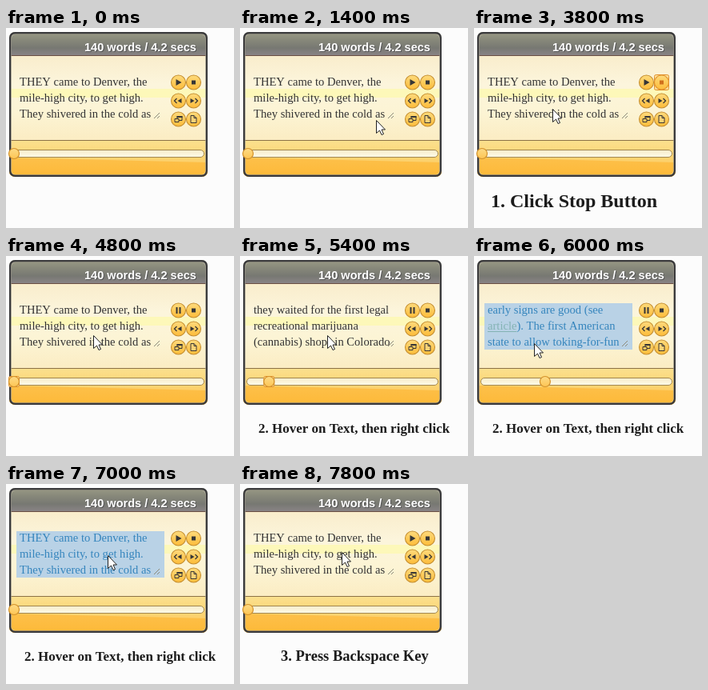
These frames come from a looping animation (285x250 px, 8000 ms). An HTML page with a canvas:

```html
<!DOCTYPE html>
<html lang="en">
<head>
<meta charset="utf-8">
<title>Speed reader</title>
<style>
html, body { margin: 0; width: 285px; height: 250px; overflow: hidden; background: #fcfcfc; }
canvas { display: block; }
</style>
</head>
<body>
<canvas id="stage" width="285" height="250"></canvas>
<script>
const ctx = document.getElementById('stage').getContext('2d');
const LOOP = 8000, STEP = 200, PAGE_TIME = 460, FADE = 400;
const SERIF = '"Liberation Serif", "Times New Roman", serif';
const SANS = '"Liberation Sans", Arial, sans-serif';
const INK = '#363636', ORANGE = '#e0902c', PALE = '#fddf98';

const pages = [
  ['THEY came to Denver, the', 'mile-high city, to get high.', 'They shivered in the cold as'],
  ['they waited for the first legal', 'recreational marijuana', '(cannabis) shops in Colorado'],
  ['to open on January 1st. The', 'new market will be watched', 'with great care, but the'],
  ['early signs are good (see', 'article). The first American', 'state to allow toking-for-fun']
];
const runs = [{ from: 1500, to: 3400 }, { from: 4600, to: 6800 }];
const captions = [
  { str: '1. Click Stop Button', x: 21, y: 224, size: 24, from: 1400, to: 4600 },
  { str: '2. Hover on Text, then right click', x: 23, y: 221, size: 17, from: 4800, to: 7400 },
  { str: '3. Press Backspace Key', x: 51, y: 221, size: 18.5, from: 7400, to: 8400 }
];
const playSpot = { x: 214, y: 71 };
const stops = [
  { at: 1000, x: 147, y: 138 },
  { at: 1600, ...playSpot },
  { at: 2400, x: 228, y: 73 },
  { at: 3800, x: 98, y: 101 },
  { at: 4600, ...playSpot },
  { at: 4800, x: 109, y: 99 },
  { at: 6000, x: 75, y: 109 },
  { at: 7000, x: 127, y: 89 },
  { at: 7200, x: 127, y: 85 }
];

const clamp = v => Math.max(0, Math.min(1, v));
const within = (t, from, to) => t >= from && t < to;

// The pointer rests at each stop, then travels so as to arrive on time.
function pointerAt(t) {
  if (t < stops[0].at) return null;
  let { x, y } = stops[0];
  for (let i = 1; i < stops.length; i++) {
    const a = stops[i - 1], b = stops[i];
    const travel = Math.min(b.at - a.at, 150 + 1.6 * Math.hypot(b.x - a.x, b.y - a.y));
    const p = clamp((t - b.at + travel) / travel);
    x += (b.x - a.x) * p;
    y += (b.y - a.y) * p;
  }
  return { x: Math.round(x), y: Math.round(y) };
}

function fade(y0, y1, ...colors) {
  const g = ctx.createLinearGradient(0, y0, 0, y1);
  colors.forEach((c, i) => g.addColorStop(i / (colors.length - 1), c));
  return g;
}

function rect(x, y, w, h, fill) {
  ctx.fillStyle = fill;
  ctx.fillRect(x, y, w, h);
}

function shape(fill, stroke, width = 1) {
  if (fill) { ctx.fillStyle = fill; ctx.fill(); }
  if (stroke) { ctx.strokeStyle = stroke; ctx.lineWidth = width; ctx.stroke(); }
}

function round(x, y, w, h, r, ...style) {
  ctx.beginPath();
  ctx.roundRect(x, y, w, h, r);
  shape(...style);
}

function circle(x, y, r, ...style) {
  ctx.beginPath();
  ctx.arc(x, y, r, 0, Math.PI * 2);
  shape(...style);
}

function poly(points, ...style) {
  ctx.beginPath();
  points.forEach(([x, y]) => ctx.lineTo(x, y));
  ctx.closePath();
  shape(...style);
}

function text(str, x, y, font, color) {
  ctx.font = font;
  ctx.fillStyle = color;
  ctx.fillText(str, x, y);
}

function drawPanel() {
  ctx.save();
  ctx.beginPath();
  ctx.roundRect(4, 5, 248, 181, 7);
  ctx.clip();
  rect(4, 5, 248, 30, fade(5, 35, '#9b9b86', '#87887a', '#777872', '#8b8588'));
  rect(4, 35, 248, 106, fade(35, 141, '#f9edcc', '#fcf5dc', '#fcf4d4', '#fbecc2'));
  rect(4, 76, 248, 11, '#fdf8b9');
  rect(4, 141, 248, 45, fade(141, 168, '#fbe08e', '#fcd06a'));
  poly([[4, 162], [252, 168], [252, 186], [4, 186]], fade(162, 186, '#fdc04a', '#fdb938'));
  rect(4, 34, 248, 1, '#6b4f43');
  rect(4, 140, 248, 1, '#8d7246');
  ctx.restore();
  round(6.5, 7.5, 243, 176, 5, null, '#fff6dc88');
  round(5.2, 6.2, 245.6, 178.6, 6, null, '#3a3a3c', 2.4);

  ctx.shadowColor = '#555';
  ctx.shadowOffsetX = ctx.shadowOffsetY = 1;
  text('140 words / 4.2 secs', 98, 29, `bold 14.55px ${SANS}`, '#fff');
  ctx.shadowColor = 'transparent';
}

function drawText(page, selected) {
  if (selected) rect(13, 59, 185, 58, '#b9d2e6');
  const font = `14.6px ${SERIF}`;
  pages[page].forEach((line, i) => {
    const y = 72 + i * 20, link = line.match(/^article/);
    ctx.font = font;
    const w = link ? ctx.measureText(link[0]).width : 0;
    if (link) {
      text(link[0], 17, y, font, '#84b3b4');
      rect(17, y + 2, w, 1, '#84b3b4');
      line = line.slice(link[0].length);
    }
    text(line, 17 + w, y, font, selected ? '#3585bd' : '#333');
  });
  ctx.beginPath();
  for (const d of [3, 7]) {
    ctx.moveTo(192 - d, 113);
    ctx.lineTo(192, 113 - d);
  }
  shape(null, '#8b8878');
}

const icons = {
  play: () => poly([[-3, -4], [4, 0], [-3, 4]], INK),
  pause() { for (const x of [-3, 1]) rect(x, -4, 2, 8, INK); },
  stop: color => rect(-2.5, -2.5, 5, 5, color),
  skip() {
    poly([[-4, -3], [1, 0], [-4, 3]], INK);
    ctx.beginPath();
    ctx.moveTo(2, -3); ctx.lineTo(5, 0); ctx.lineTo(2, 3);
    shape(null, INK, 1.3);
  },
  back() { ctx.scale(-1, 1); icons.skip(); },
  popup() {
    round(-1.5, -3.5, 6, 5, 0, null, INK);
    round(-4.5, -0.5, 5, 4, 0, '#fdc95e', INK);
    rect(-2, -4, 7, 2, INK);
  },
  page() {
    poly([[-3.5, -4.5], [0.5, -4.5], [3.5, -1.5], [3.5, 4.5], [-3.5, 4.5]], '#fdd376', INK);
    ctx.beginPath();
    ctx.moveTo(0.5, -4.5); ctx.lineTo(0.5, -1.5); ctx.lineTo(3.5, -1.5);
    shape(null, INK);
  }
};

function drawButtons(playing, stopHot, stopFocus) {
  const names = [playing ? 'pause' : 'play', 'stop', 'back', 'skip', 'popup', 'page'];
  names.forEach((name, i) => {
    const x = 215.5 + 19 * (i % 2), y = 68 + 23 * Math.floor(i / 2);
    const hot = name === 'stop' && stopHot;
    if (hot && stopFocus) round(x - 9, y - 9.5, 18, 19, 2, PALE, ORANGE);
    circle(x, y, 9, fade(y - 9, y + 9, '#fdda7c', '#fdbc3a'), hot ? ORANGE : '#c58f30', 1.1);
    ctx.save();
    ctx.translate(x, y);
    icons[name](hot ? '#d0701c' : INK);
    ctx.restore();
  });
}

function drawSlider(page, focused) {
  round(8.5, 152.5, 239, 9, 4.5, fade(152, 162, '#f6ecc9', '#fffbe9'), '#a28850');
  const x = 10 + page * 26.3;
  if (focused) round(x - 6.5, 150.5, 13, 13, 2, PALE, ORANGE);
  circle(x, 157, 6.5, fade(150, 164, '#fddc88', '#fdc452'), '#d4922b', 1.2);
}

function drawPointer({ x, y }) {
  ctx.save();
  ctx.translate(x + 0.5, y + 0.5);
  poly([[0, 0], [0, 16], [4, 12.5], [6.5, 18], [9, 17], [6.5, 11.5], [11, 11.5]], '#fff', '#222');
  ctx.restore();
}

function draw(t) {
  const run = runs.find(r => within(t, r.from, r.to));
  const page = run ? Math.min(pages.length - 1, Math.floor((t - run.from) / PAGE_TIME)) : 0;
  rect(0, 0, 285, 250, '#fcfcfc');
  drawPanel();
  drawText(page, within(t, 5800, 7200));
  drawButtons(run, within(t, 2400, 4400), t >= runs[0].to);
  drawSlider(page, run && t < run.from + 2 * PAGE_TIME);

  for (const { str, x, y, size, from, to } of captions) {
    ctx.globalAlpha = clamp((t - from) / FADE) * clamp((to - t) / FADE);
    text(str, x, y, `bold ${size}px ${SERIF}`, '#1c1c1c');
  }
  ctx.globalAlpha = 1;

  const tip = pointerAt(t);
  if (tip) drawPointer(tip);
}

let start = null;
function tick(now) {
  if (start === null) start = now;
  draw(Math.floor(((now - start) % LOOP) / STEP) * STEP);
  requestAnimationFrame(tick);
}
draw(0);
requestAnimationFrame(tick);
</script>
</body>
</html>
```
